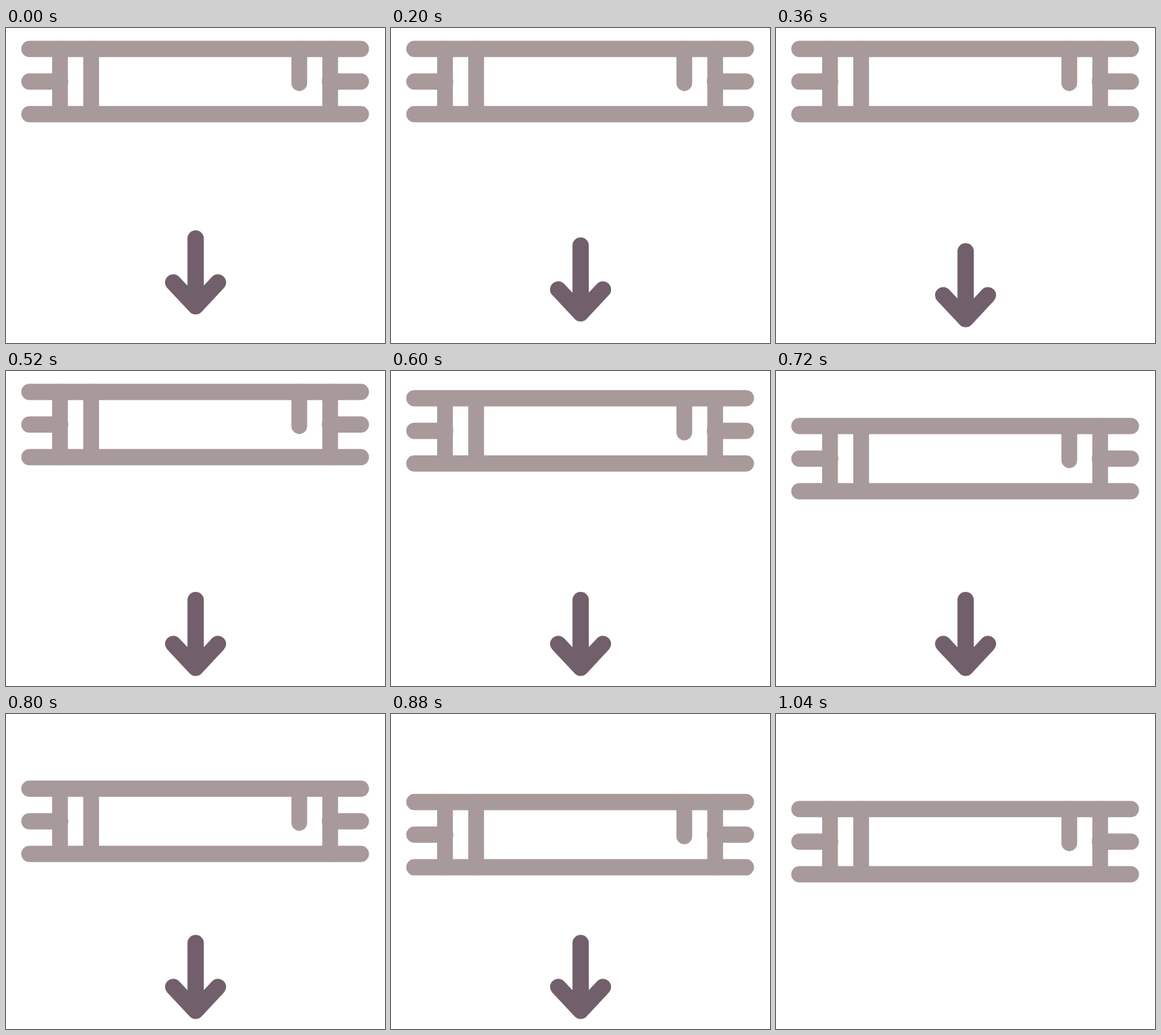
Animation, 510 px wide and 425 px high, one loop 1080 ms. Source, as an HTML page:

```html
<!DOCTYPE html>
<html lang="en">
<head>
<meta charset="utf-8">
<title>Board and arrow</title>
<style>
  html, body { margin: 0; width: 100%; height: 100%; overflow: hidden; background: #fff; }
  svg { display: block; width: 100%; height: 100%; }
  path { fill: none; stroke-linecap: round; stroke-linejoin: round; }
</style>
</head>
<body>
<svg viewBox="0 0 510 425">
  <g id="board" stroke="#a8999b">
    <path stroke-width="22" d="M31.5 28.2H477.5M31.5 72.2H72.7M436 72.2H477.5M31.5 116.3H477.5"/>
    <path stroke-width="21.2" d="M72.7 28.2V116.3M114.6 28.2V116.3M436.2 28.2V116.3M394.7 28.2V74.6"/>
  </g>
  <g id="arrow" stroke="#715f6b">
    <path stroke-width="22" d="M255.2 284V375.4M225 343.2L255.2 375.4L285.2 343.2"/>
  </g>
</svg>
<script>
const LOOP = 1080, STEP = 40;
const ARROW_END = 520, BOARD_END = 1000, ARROW_HIDE = 1040;
const board = document.getElementById('board');
const arrow = document.getElementById('arrow');

const progress = (t, from, to) => Math.min(1, Math.max(0, (t - from) / (to - from)));

// Cubic bezier easing with handles (0.335, 0) and (0.505, 1), solved by bisection.
function ease(x) {
  if (x <= 0 || x >= 1) return x;
  let low = 0, high = 1;
  for (let i = 0; i < 24; i++) {
    const s = (low + high) / 2, r = 1 - s;
    const bx = 3 * s * r * r * 0.335 + 3 * s * s * r * 0.505 + s * s * s;
    if (bx < x) low = s; else high = s;
  }
  return low * low * (3 - 2 * low);
}

function draw(time) {
  const t = Math.floor((time % LOOP) / STEP) * STEP;
  const boardY = 100 * ease(progress(t, ARROW_END, BOARD_END));
  const arrowY = 25 * progress(t, 0, ARROW_END);
  board.setAttribute('transform', `translate(0 ${boardY.toFixed(2)})`);
  arrow.setAttribute('transform', `translate(0 ${arrowY.toFixed(2)})`);
  arrow.setAttribute('visibility', t < ARROW_HIDE ? 'visible' : 'hidden');
}

let start;
function tick(now) {
  start ??= now;
  draw(now - start);
  requestAnimationFrame(tick);
}
draw(0);
requestAnimationFrame(tick);
</script>
</body>
</html>
```
